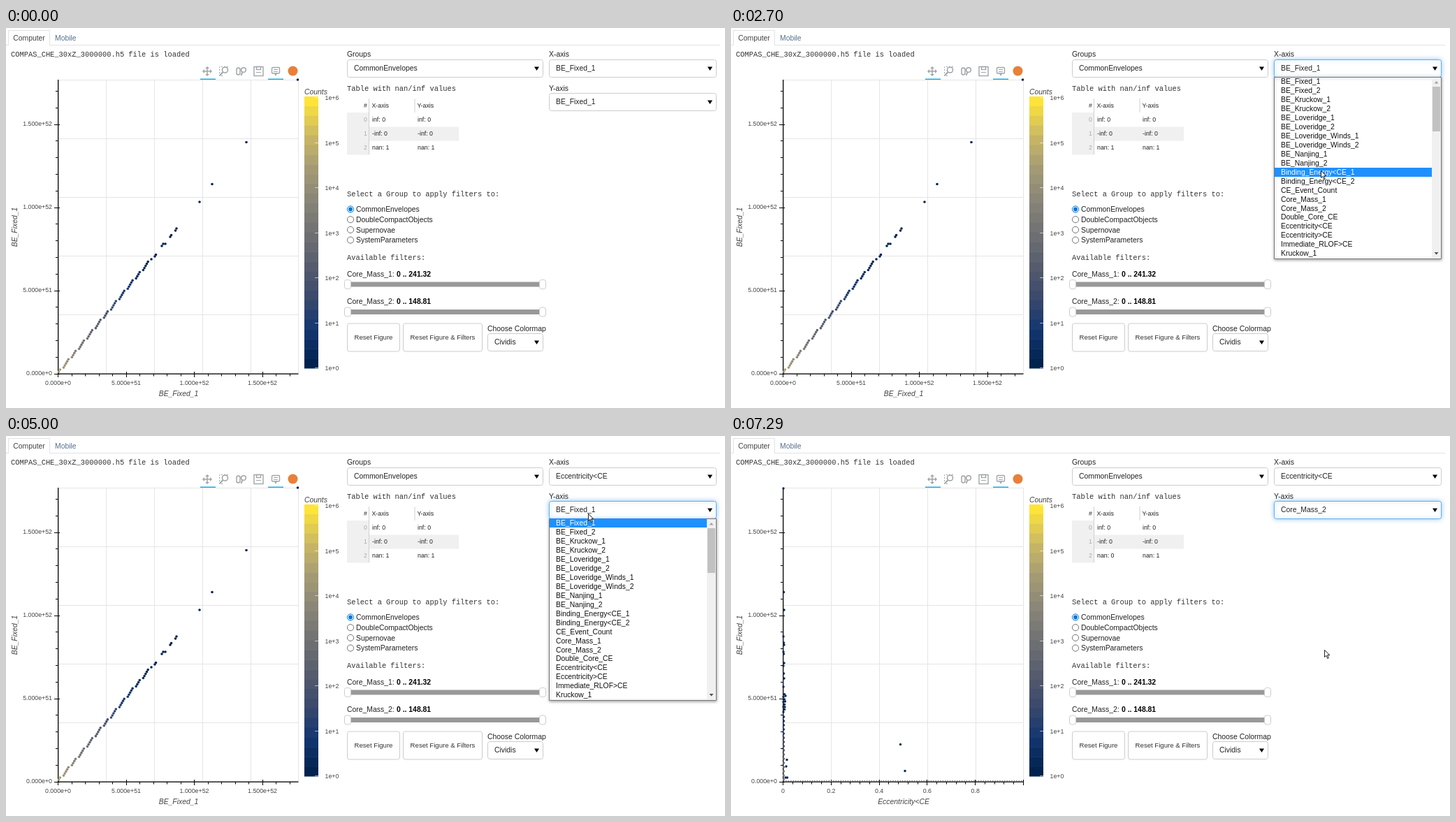
An HTML page with a canvas that plays this animation: 1029 px wide and 544 px high, repeating every 8 s.

```html
<!DOCTYPE html>
<html lang="en">
<head>
<meta charset="utf-8">
<title>Data explorer</title>
<style>
html, body { margin: 0; width: 100%; height: 100%; overflow: hidden; background: #fff; }
canvas { display: block; }
</style>
</head>
<body>
<canvas id="stage" width="1029" height="544"></canvas>
<script>
const c = document.getElementById('stage').getContext('2d');
const SANS = '"Liberation Sans", Arial, sans-serif';
const MONO = '"Liberation Mono", "Courier New", monospace';
const LOOP = 8000, ROW = 12.97;
const CLICKS = [[1170, 1310], [3250, 3470], [4900, 5000], [7070, 7290]];
const OPTIONS = ['BE_Fixed_1', 'BE_Fixed_2', 'BE_Kruckow_1', 'BE_Kruckow_2', 'BE_Loveridge_1',
  'BE_Loveridge_2', 'BE_Loveridge_Winds_1', 'BE_Loveridge_Winds_2', 'BE_Nanjing_1', 'BE_Nanjing_2',
  'Binding_Energy<CE_1', 'Binding_Energy<CE_2', 'CE_Event_Count', 'Core_Mass_1', 'Core_Mass_2',
  'Double_Core_CE', 'Eccentricity<CE', 'Eccentricity>CE', 'Immediate_RLOF>CE', 'Kruckow_1'];
// Pointer path: time, x, y, number of jumps on the way to the next stop
const PATH = [[300, 954, 470, 2], [510, 833, 63, 1], [2260, 833, 63, 1], [2370, 838, 147, 7],
  [3130, 851, 281, 1], [3680, 851, 281, 6], [4340, 833, 111, 1], [5650, 833, 111, 4],
  [6090, 842, 199, 4], [6530, 848, 296, 4], [6960, 849, 306, 1]];
const CIVIDIS = [[0, 34, 78], [18, 53, 112], [59, 73, 108], [87, 93, 109], [112, 113, 115],
  [138, 134, 120], [165, 156, 116], [205, 186, 98], [254, 228, 56]];

const during = (t, [a, b]) => t >= a && t < b;

function cividis(v) {
  const p = Math.max(0, Math.min(0.9999, v)) * 8, i = Math.floor(p);
  return `rgb(${CIVIDIS[i].map((a, k) => Math.round(a + (CIVIDIS[i + 1][k] - a) * (p - i)))})`;
}

function text(s, x, y, { size = 10.4, color = '#222', align = 'left', style = '', font = SANS } = {}) {
  c.font = `${style} ${size}px ${font}`;
  c.fillStyle = color;
  c.textAlign = align;
  c.fillText(s, x, Math.round(y + size * 0.36));
}

function rect(x, y, w, h, color) {
  c.fillStyle = color;
  c.fillRect(x, y, w, h);
}

function line(color, width, ...pts) {
  c.strokeStyle = color;
  c.lineWidth = width;
  c.beginPath();
  for (let i = 0; i < pts.length; i += 2) c.lineTo(pts[i], pts[i + 1]);
  c.stroke();
}

function poly(color, ...pts) {
  c.fillStyle = color;
  c.beginPath();
  for (let i = 0; i < pts.length; i += 2) c.lineTo(pts[i], pts[i + 1]);
  c.closePath();
  c.fill();
}

function disc(x, y, r, color) {
  c.fillStyle = color;
  c.beginPath();
  c.arc(x, y, r, 0, 7);
  c.fill();
}

function ring(x, y, r, color, width) {
  c.strokeStyle = color;
  c.lineWidth = width;
  c.beginPath();
  c.arc(x, y, r, 0, 7);
  c.stroke();
}

function box(x, y, w, h, border = '#ccc', r = 3) {
  c.beginPath();
  c.roundRect(x + 0.5, y + 0.5, w - 1, h - 1, r);
  c.fillStyle = '#fff';
  c.fill();
  c.strokeStyle = border;
  c.lineWidth = 1;
  c.stroke();
}

function select(x, y, w, value, focus) {
  c.save();
  if (focus) { c.shadowColor = 'rgba(102,175,233,.7)'; c.shadowBlur = 6; }
  box(x, y, w, 26, focus ? '#66afe9' : '#ccc');
  c.restore();
  text(value, x + 10, y + 12.5);
  poly('#000', x + w - 13, y + 10.5, x + w - 6, y + 10.5, x + w - 9.5, y + 16);
}

function slider(label, range, y) {
  text(label, 488, y - 15);
  text(range, 559, y - 15, { style: 'bold', color: '#000' });
  rect(489, y - 3.5, 279, 7, '#999');
  box(484, y - 7, 10, 14, '#ccc');
  box(763, y - 7, 10, 14, '#ccc');
}

function toolbar() {
  const g = '#a1a6a9';
  line(g, 1.5, 282, 62, 294, 62);
  line(g, 1.5, 288, 56, 288, 68);
  poly(g, 281, 62, 284, 59, 284, 65);
  poly(g, 295, 62, 292, 59, 292, 65);
  poly(g, 288, 55, 285, 58, 291, 58);
  poly(g, 288, 69, 285, 66, 291, 66);
  c.setLineDash([2, 2]);
  line(g, 1, 318, 55.5, 305.5, 55.5, 305.5, 68.5, 312, 68.5);
  c.setLineDash([]);
  ring(313.5, 60, 4, g, 1.6);
  line(g, 2, 310.5, 63, 306, 68);
  c.strokeStyle = g;
  c.lineWidth = 1.5;
  c.beginPath();
  c.roundRect(330, 57, 5, 10, 2.5);
  c.stroke();
  ring(340, 60, 3.3, g, 1.5);
  line(g, 1.8, 338.5, 63, 336.5, 68);
  c.strokeStyle = g;
  c.lineWidth = 1.4;
  c.strokeRect(355, 55.5, 13, 13);
  c.strokeRect(358.5, 55.5, 6, 4);
  rect(358, 63, 7, 1, g);
  c.beginPath();
  c.roundRect(380.5, 56.5, 11, 8.5, 1.5);
  c.stroke();
  poly(g, 384, 65, 388, 65, 386, 69);
  rect(383, 59, 6, 1, g);
  rect(383, 62, 6, 1, g);
  rect(278, 72.5, 22, 1.5, '#26aae1');
  rect(375, 72.5, 22, 1.5, '#26aae1');
  disc(410.5, 61.5, 7, '#e8803a');
}

function diagonalDots() {
  const dot = (x, y, v) => disc(x, y, 1.8, cividis(v));
  for (let r = 1; r < 55; r++) {
    const d = r * 2.97, odd = (r % 2) / 2, w = 3.4;
    const x = 74 + w * (Math.round(d * 0.813 / w - odd) + odd);
    dot(x, 495 - d, 0.78 * Math.max(0.02, 1 - d / 175) ** 1.5);
  }
  [208, 331, 213, 327, 214.5, 324.5, 223, 312, 225, 309, 228, 309, 235, 299, 236.5, 296.5, 242.5, 290,
    244, 287, 277, 249, 295, 223.5, 344, 163.5, 417.5, 74]
    .forEach((x, i, a) => { if (i % 2 === 0) dot(x, a[i + 1], 0); });
}

function columnDots() {
  const dot = (x, y, v = 0.02) => disc(x, y, 1.7, cividis(v));
  for (let x = 79; x < 418; x += 3.4) disc(x, 494, 0.9, cividis(0.5));
  for (let i = 0; i < 16; i++) dot(75.5, 492 - i * 6, 0.62 - i * 0.037);
  for (let i = 0; i < 8; i++) dot(75 + i % 2 * 1.5, 395 - i * 3.6);
  [75, 223.5, 249, 287, 296, 299, 309, 312, 325, 329, 340, 347, 359].forEach((y, i) => dot(75 + i % 3 / 2, y));
  [78, 372, 77.5, 380, 77, 388, 80, 463.5, 79, 473, 78, 489, 80.5, 489, 242.5, 441.5, 249, 479.5]
    .forEach((x, i, a) => { if (i % 2 === 0) dot(x, a[i + 1]); });
}

function plot(updated) {
  for (let i = 1; i < 5; i++) {
    rect(Math.round(74.5 + i * 68.75), 74, 1, 421, '#e5e5e5');
    rect(74, Math.round(494.5 - i * 84.2), 344, 1, '#e5e5e5');
  }
  line('#e5e5e5', 1, 74, 74.5, 418.5, 74.5, 418.5, 495);
  rect(74, 74, 1.3, 421, '#000');
  rect(74, 494.5, 344.5, 1.3, '#000');
  const small = { size: 8.8, color: '#444' };
  for (let i = 0; i < 18; i++) {
    const y = 494.5 - i * 23.8, major = i % 5 === 0;
    rect(major ? 69 : 71, Math.round(y), major ? 8 : 3, 1, '#000');
    if (major) text(['0.000e+0', '5.000e+51', '1.000e+52', '1.500e+52'][i / 5], 66, y - 0.5, { ...small, align: 'right' });
  }
  const gap = updated ? 13.76 : 19.5;
  const names = updated ? ['0', '0.2', '0.4', '0.6', '0.8'] : ['0.000e+0', '5.000e+51', '1.000e+52', '1.500e+52'];
  for (let i = 0; i * gap < 344.5; i++) {
    const x = 74 + i * gap, major = i % 5 === 0;
    rect(Math.round(x), major ? 492 : 495, 1, major ? 8 : 3.5, '#000');
    if (major && names[i / 5]) text(names[i / 5], x + 0.5, 507.5, { ...small, align: 'center' });
  }
  const title = { style: 'italic', color: '#444', align: 'center' };
  text(updated ? 'Eccentricity<CE' : 'BE_Fixed_1', 247, 523, title);
  c.save();
  c.translate(12, 285);
  c.rotate(-Math.PI / 2);
  text('BE_Fixed_1', 0, 0, title);
  c.restore();
  updated ? columnDots() : diagonalDots();

  text('Counts', 427, 91, { style: 'italic', color: '#444' });
  const bands = 28, h = 389 / bands;
  for (let i = 0; i < bands; i++) rect(427, 98 + i * h, 20, h + 0.5, cividis(1 - i / (bands - 1)));
  for (let i = 0; i < 7; i++) {
    const y = 487 - i * 64.5;
    rect(442, Math.round(y) - 1, 5, 1, 'rgba(255,255,255,.6)');
    text('1e+' + i, 456.5, y, small);
  }
}

function table(updated) {
  const s = { size: 8.8 }, grey = { size: 8.8, color: '#aaa', align: 'right' };
  text('Table with nan/inf values', 488, 86, { font: MONO, color: '#333' });
  text('#', 517, 111, { ...s, align: 'right' });
  text('X-axis', 523.5, 111, s);
  text('Y-axis', 588.5, 111, s);
  rect(488, 121, 31, 60.5, '#f0f0f0');
  rect(519, 141.5, 129, 20, '#f0f0f0');
  rect(519, 101, 1, 80, '#d0d0d0');
  rect(584.5, 101, 1, 20, '#d0d0d0');
  ['inf: 0', '-inf: 0', 'nan: 1'].forEach((v, i) => {
    const y = 131 + i * 20;
    text(i, 517, y, grey);
    text(i === 2 && updated ? 'nan: 0' : v, 524, y, s);
    text(v, 589, y, s);
  });
}

function page(updated) {
  rect(0, 0, 1029, 544, '#fff');
  line('#e2e2e2', 1, 0, 24.5, 3.5, 24.5, 3.5, 3.5, 62.5, 3.5, 62.5, 24.5, 1022, 24.5);
  text('Computer', 33, 14.5, { align: 'center', color: '#444' });
  text('Mobile', 70, 14.5, { color: '#56708f' });
  text('COMPAS_CHE_30xZ_3000000.h5 file is loaded', 7, 37.5, { font: MONO, color: '#333' });
  toolbar();
  plot(updated);
  text('Groups', 488, 37.5);
  select(488, 45, 281, 'CommonEnvelopes');
  table(updated);
  text('Select a Group to apply filters to:', 488, 237.5, { font: MONO, color: '#333' });
  ['CommonEnvelopes', 'DoubleCompactObjects', 'Supernovae', 'SystemParameters'].forEach((name, i) => {
    const y = 259.5 + i * 14.7;
    ring(493, y, 4.6, i ? '#767676' : '#0075d8', 1);
    if (!i) disc(493, y, 2.9, '#0075d8');
    text(name, 501, y);
  });
  text('Available filters:', 488, 328.5, { font: MONO, color: '#333' });
  slider('Core_Mass_1:', '0 .. 241.32', 367);
  slider('Core_Mass_2:', '0 .. 148.81', 406.5);
  box(488, 422.5, 76, 41);
  box(568, 422.5, 114, 41);
  const label = { size: 9.6, color: '#333', align: 'center' };
  text('Reset Figure', 526, 443, label);
  text('Reset Figure & Filters', 625, 443, label);
  text('Choose Colormap', 689, 430);
  select(689, 437, 80, 'Cividis');
  text('X-axis', 777, 37.5);
  text('Y-axis', 777, 86);
}

function menu(top, active, alpha) {
  c.save();
  c.globalAlpha = alpha;
  c.shadowColor = 'rgba(0,0,0,.35)';
  c.shadowBlur = 4;
  c.shadowOffsetY = 1;
  box(777, top, 240, 261, '#777', 0);
  c.shadowColor = 'transparent';
  rect(1003, top + 1, 13, 259, '#f0f0f0');
  rect(1004, top + 14, 11, 64, '#c1c1c1');
  poly('#a3a3a3', 1006.5, top + 9.5, 1012.5, top + 9.5, 1009.5, top + 6);
  poly('#505050', 1006.5, top + 251, 1012.5, top + 251, 1009.5, top + 254.5);
  rect(778, Math.round(top + active * ROW + 0.2), 225, 13, '#1e90ff');
  OPTIONS.forEach((name, i) =>
    text(name, 787, top + i * ROW + 6.2, { color: i === active ? '#fff' : '#111' }));
  c.restore();
}

function pointer(t) {
  if (t < PATH[0][0]) return null;
  const i = PATH.findLastIndex(p => p[0] <= t);
  const [t0, x0, y0, n] = PATH[i], [t1, x1, y1] = PATH[i + 1] || [LOOP, x0, y0];
  const p = Math.floor((t - t0) / (t1 - t0) * n + 1e-6) / n;
  return [x0 + (x1 - x0) * p, y0 + (y1 - y0) * p];
}

function drawPointer([x, y], pressed) {
  if (pressed) disc(x, y + 0.5, 7, 'rgba(240,228,20,.75)');
  c.save();
  c.translate(Math.round(x) + 0.5, Math.round(y) + 0.5);
  c.lineJoin = 'round';
  const shape = [0, 0, 0, 10, 2.4, 7.8, 4.2, 12, 5.8, 11.3, 4.1, 7.2, 7.4, 7.2, 0, 0];
  poly('#fff', ...shape);
  line('#222', 1, ...shape);
  c.restore();
}

function draw(t) {
  const xOpen = during(t, [1170, 3470]), yOpen = during(t, [4900, 7290]);
  const pos = pointer(t);
  page(t >= 5870);
  select(777, 45, 240, t < 3470 ? 'BE_Fixed_1' : 'Eccentricity<CE', during(t, [1170, 4900]));
  select(777, 93, 240, t < 7290 ? 'BE_Fixed_1' : 'Core_Mass_2', t >= 4900);
  if (xOpen || yOpen) {
    const top = xOpen ? 70 : 118.5;
    const fading = during(t, CLICKS[0]) || during(t, CLICKS[2]);
    menu(Math.floor(top), Math.max(0, Math.floor((pos[1] - top - 3) / ROW)), fading ? 0.55 : 1);
  }
  if (pos) drawPointer(pos, CLICKS.some(s => during(t, s)));
}

const start = performance.now();
function tick() {
  draw((performance.now() - start) % LOOP);
  requestAnimationFrame(tick);
}
tick();
</script>
</body>
</html>
```
